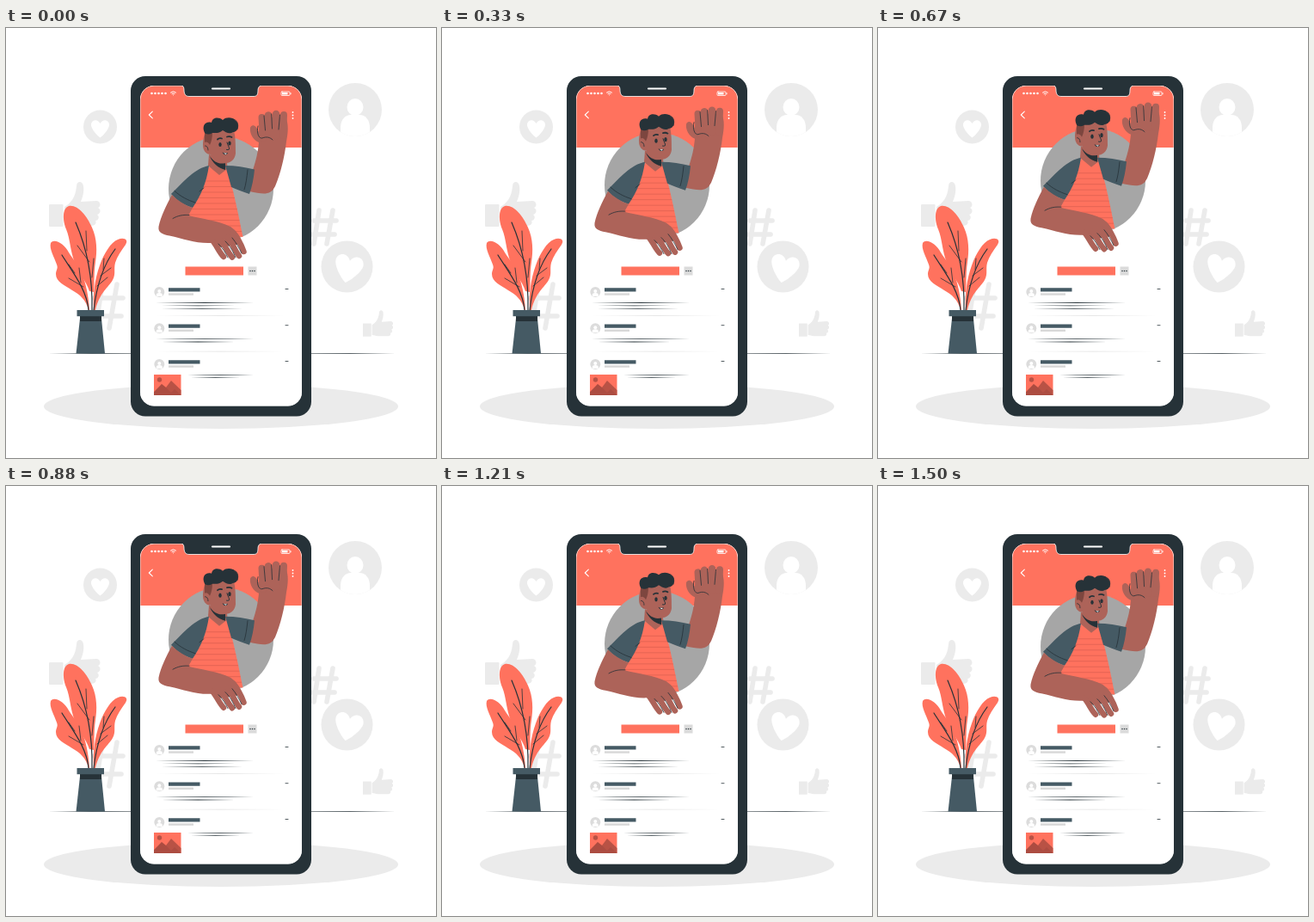
Animation, 500 px wide and 500 px high, one loop 1540 ms. Source, as an HTML page:

```html
<!DOCTYPE html>
<html lang="en">
<head>
<meta charset="utf-8">
<style>
html, body { margin: 0; width: 100%; height: 100%; overflow: hidden; background: #fff }
svg { display: block; width: 100vw; height: 100vh }
.pale { fill: #ebebeb }
.white { fill: #fff }
.coral { fill: #ff725e }
.slate { fill: #455a64 }
.ink { fill: #263238 }
.skin { fill: #ad6359 }
.line { fill: none; stroke: #263238; stroke-width: .8; stroke-linecap: round; stroke-linejoin: round }
.finger { fill: none; stroke: #ad6359; stroke-linecap: round; stroke-linejoin: round }
.hash { fill: none; stroke: #ebebeb; stroke-width: 5.6; stroke-linecap: round }
.stripe { fill: none; stroke: #d85f4f; stroke-width: .7 }
.glyph { fill: none; stroke: #fff; stroke-width: 1.3; stroke-linecap: round; stroke-linejoin: round }
.rim { stroke: #fff; stroke-width: .8 }
</style>
</head>
<body>
<svg viewBox="0 0 500 500">
  <defs>
    <path id="heart" d="M0 10.5C-5 7-11-1-10.5-5C-10-10.5-3-12 0-6C3-12 10-10.5 10.5-5C11-1 5 7 0 10.5Z"/>
    <g id="thumb">
      <rect x="50" y="205" width="16.5" height="26" rx="1"/>
      <path d="M68 208C75 204 81 197 82 184C82 178 89 177 90 184C91 191 89 197 87 202L105 201C110 201 111 208 107 209C111 211 110 216 106 217C109 219 108 224 104 224C106 227 103 230 99 230H80C75 230 72 228 68 228Z"/>
    </g>
    <clipPath id="badge"><circle cx="406" cy="95" r="31"/></clipPath>
    <clipPath id="screen"><rect x="156" y="67" width="188" height="372.5" rx="16"/></clipPath>
    <clipPath id="shirt"><path d="M236 161L248 171L257 164C265 190 270 216 275.5 243L240 240L211 219C220 202 229 181 236 161Z"/></clipPath>
  </defs>

  <ellipse class="pale" cx="250" cy="440" rx="206" ry="26"/>
  <path class="ink" d="M49 378.400L100 378L150 378.300H350L400 378L453 378.400L400 378.800H100Z"/>

  <circle class="pale" cx="109.500" cy="115" r="19.500"/>
  <use href="#heart" class="white" transform="translate(109.500 117)"/>
  <circle class="pale" cx="406" cy="95" r="31"/>
  <g class="white" clip-path="url(#badge)">
    <ellipse cx="406" cy="92" rx="9.500" ry="10"/>
    <path d="M389 127V116C389 106 395 101 401 101H411C418 101 423 107 423 116V127Z"/>
  </g>
  <circle class="pale" cx="396.500" cy="277.500" r="30"/>
  <use href="#heart" class="white" transform="translate(398 280) rotate(12) scale(1.560)"/>
  <use href="#thumb" class="pale"/>
  <use href="#thumb" class="pale" transform="translate(385.500 222.500) scale(.590)"/>
  <path class="hash" d="M364 212L358 251M380 212L373 251M358 224H384M356 240H382"/>
  <path class="hash" d="M112 299L104 348M129 298L120 349M102 314H136M100 335H134"/>

  <g id="plant">
    <path class="coral" d="M96 328C93 316 86 310 77 305C68 299 58 295 58 286C58 281 61 280 59 275C56 266 50 257 52 250C56 244 68 251 73 261C78 269 84 275 88 285C93 297 96 312 97 328Z"/>
    <path class="coral" d="M102 328C101 309 103 293 109 276C114 262 122 249 130 246C137 243 143 246 139 252C134 259 129 266 127 273C125 281 128 286 124 293C119 302 109 307 104 328Z"/>
    <path class="coral" d="M97 306C93 294 84 284 80 273C74 257 75 246 70 234C66 224 65 210 73 207C83 205 94 218 100 232C106 245 106 260 104 272C102 285 103 294 102 307Z"/>
    <path class="line" style="stroke-width:1.200" d="M81 226C91 249 101 285 100 328M65 264C79 286 94 305 96 328M127 257C112 277 105 302 102 328"/>
    <path class="line" d="M94 259L93 236M97 272L83 253M100 290L102 268M80 285L73 275M87 296L85 279M90 301L73 291M113 281L114 268M110 288L122 279M106 300L118 290"/>
    <path class="slate" d="M86 338H111L115 378.500H81.500Z"/>
    <path class="ink" d="M86 334H111V341H86Z"/>
    <path class="slate" d="M82.500 328H114V335.200H82.500Z"/>
  </g>

  <rect class="ink" x="145" y="56" width="210" height="395.500" rx="17"/>
  <g clip-path="url(#screen)">
    <path class="white" d="M156 67H344V440H156Z"/>
    <path class="coral" d="M156 67H344V139H156Z"/>
    <rect class="rim" fill="none" x="156" y="67" width="188" height="372.500" rx="16"/>
    <path class="ink rim" d="M203 66C206 67 207 69 207 72C207 77 209 79.500 213 79.500H288C292 79.500 293 77 293 72C293 69 295 67 298 66Z"/>
  </g>
  <path class="glyph" style="stroke-width:2.200" d="M240 70.500H260"/>
  <path class="glyph" style="stroke-width:2.600" stroke-dasharray="0 4" d="M169.500 76H186"/>
  <path class="glyph" style="stroke-width:1" d="M191.500 75Q194.500 72.500 197.500 75M193 76.500Q194.500 75.300 196 76.500M194.500 78V78"/>
  <rect class="glyph" style="stroke-width:.800" x="320" y="74" width="10" height="4.500" rx="1"/>
  <path class="white" d="M321 75H327.500V77.500H321ZM330.500 75.300H331.500V77.200H330.500Z"/>
  <path class="glyph" style="stroke-width:1.100" d="M170.300 97.200L166.300 101L170.300 104.800"/>
  <path class="glyph" style="stroke-width:1.800" stroke-dasharray="0 3.500" d="M333.500 98V105.500"/>

  <path class="coral" d="M208.500 277.500H276V287.500H208.500Z"/>
  <path fill="#dbdbdb" d="M281.500 277.500H291.500V287.500H281.500Z"/>
  <path class="line" style="stroke-width:1.500" stroke-dasharray="0 2.500" d="M284 282.500H289.200"/>
  <g id="posts"></g>
  <path fill="#dedede" d="M174 334.500L250 334.200L324 334.500L250 334.900ZM174 376L250 375.700L324 376L250 376.400Z"/>
  <path class="coral" d="M172 403H203.500V427H172Z"/>
  <path fill="#b85245" d="M172 423L181 414L186 418L192 410L203.500 421V427H172Z"/>
  <path fill="#944338" d="M172 427V424L181 414L186 418L192 424L196 420L203.500 427Z" opacity=".350"/>
  <circle cx="178.500" cy="409" r="2.700" fill="#b85245"/>

  <g id="person">
    <circle cx="250" cy="187" r="61" fill="#a6a6a6"/>
    <path class="skin" d="M236 147L235 160L248 173L258 165L256 150Z"/>
    <path class="ink" d="M237 149C242 156 248 159 255 157V165C247 163 240 157 237 149Z"/>

    <path class="skin" d="M287 165C291 153 293 144 294 133C287 130 283 122 284 116C286 111 291 113 294 121L296 104H325C329 111 328 122 326 132C324 150 319 170 313 184C308 194 301 194 283 190Z"/>
    <path class="finger" stroke-width="8" d="M299 128L297.500 104"/>
    <path class="finger" stroke-width="8.500" d="M306 125L305 101.500M314 125L314 100"/>
    <path class="finger" stroke-width="8" d="M322 125L323 101"/>
    <path class="line" d="M301.500 119L300 102M309.500 117L308.700 100M317 118L318.500 101M293 114C291 122 294 129 298 128C303 126 307 127 310 130"/>

    <g clip-path="url(#shirt)">
      <path class="coral" d="M208 155H280V245H208Z"/>
      <path class="stripe" id="stripes"/>
    </g>
    <path class="slate" d="M236 160C220 163 207 178 192 193C199 201 207 206 217 209C226 196 233 181 236 160Z"/>
    <path class="slate" d="M255 160C267 160 278 162 289 164.500C288 175 286 185 283 193C275 190 268 188 262 185Z"/>
    <path class="line" d="M196 189.500C203 196 211 200 220 203M225 190L230 186M281 165C280 174 279 182 277 188"/>

    <path class="skin" d="M193 194C186 207 180 219 177.500 231C176.500 238 182 240 190 241.500C207 245 221 251 239 250L250 255L274 251C274 243 268 236 261 231C246 224 229 222 212 218L217 209C208 206 200 201 193 194Z"/>
    <path class="finger" stroke-width="6.500" d="M240 247C245 253 248 261 253 266M249 246C255 253 258 261 263 266.500M258 243C264 251 266 259 271 265M264 238C271 246 274 253 276.500 260"/>
    <path class="line" d="M194 221.500C200 218 206 217 213 217.500M247 251C252 256 255 261 258 267M255 248C261 254 264 260 267 267M263 244C268 250 271 256 274 262"/>

    <path class="skin" d="M234 118L264 116C267 124 267 136 267 146C266 154 260 158 252 157C245 156 240 152 238 147C232 147 229 142 229 136C229 131 230 122 234 118Z"/>
    <path fill="#7d463f" d="M231 121H240C240 127 239 132 237 136C235 132 232 132 231 133Z"/>
    <path class="ink" d="M231 122C227 114 232 108 239 110C240 104 247 103 252 107C256 103 264 104 266 107C272 110 271 121 264 121C260 124 255 121 252 119C248 123 243 122 240 122Q235 125 231 122Z"/>
    <path class="line" d="M263 106C269 106 271 112 269 118M231.500 137Q235 137 235 142"/>
    <ellipse class="ink" cx="249" cy="135.500" rx="1.700" ry="2.600"/>
    <ellipse class="ink" cx="260" cy="134" rx="1.700" ry="2.600"/>
    <path class="line" style="stroke-width:1.800" d="M246 129.500Q248 127.500 251 128.500M257 126.500Q260 125.500 262.500 127"/>
    <path class="line" style="stroke-width:1" d="M257 133C258 137 260 139 259.500 141Q258 142 256.500 141.500"/>
    <path class="ink" d="M251.500 144.500Q255 146 258 145C257 148 253.500 148.500 251.500 144.500Z"/>
    <path class="white" d="M253 145.500L257 145.700L255.500 147Z"/>
  </g>
</svg>
<script>
const byId = id => document.getElementById(id);
const LOOP = 1540, PEAK = 720, LIFT = 9.7;

const taper = (x1, x2, y) => {
  const mid = (x1 + x2) / 2;
  return `<path class="ink" d="M${x1} ${y}Q${mid} ${y - .8} ${x2} ${y}Q${mid} ${y + .8} ${x1} ${y}Z"/>`;
};

const post = (y, lines) => `<g transform="translate(0 ${y})">
  <circle cx="178.300" cy="0" r="6" fill="#dcdcdc"/>
  <circle class="white" cx="178.300" cy="-1" r="2"/>
  <path class="white" d="M174.800 5V3Q175 1 178.300 1Q181.600 1 181.800 3V5Z"/>
  <path class="slate" d="M189-4.700H225.500V-.500H189Z"/>
  <path fill="#d8d8d8" d="M189 1.300H218V3.800H189Z"/>
  <path class="line" d="M325-3.500H328"/>
  ${lines.map(([x1, x2, dy]) => taper(x1, x2, dy)).join('')}</g>`;

const wide = [[174, 288, 12.5], [181, 266, 15.8], [181, 275, 19.3]];
byId('posts').innerHTML = post(307, wide) + post(349.2, wide.slice(0, 2)) +
  post(391, [[211, 288, 12.4], [215, 272, 15.6]]);

byId('stripes').setAttribute('d',
  Array.from({ length: 10 }, (_, i) => `M208 ${178 + i * 6.5}H280`).join(''));

// Rise to the peak and sink back, halfway between a linear and a cosine ramp.
function lift(t) {
  const u = t < PEAK ? t / PEAK : (LOOP - t) / (LOOP - PEAK);
  return LIFT * (u + (1 - Math.cos(Math.PI * u)) / 2) / 2;
}

function draw() {
  const t = performance.now() % LOOP;
  byId('person').setAttribute('transform', `translate(0 ${-lift(t)})`);
  requestAnimationFrame(draw);
}
draw();
</script>
</body>
</html>
```
